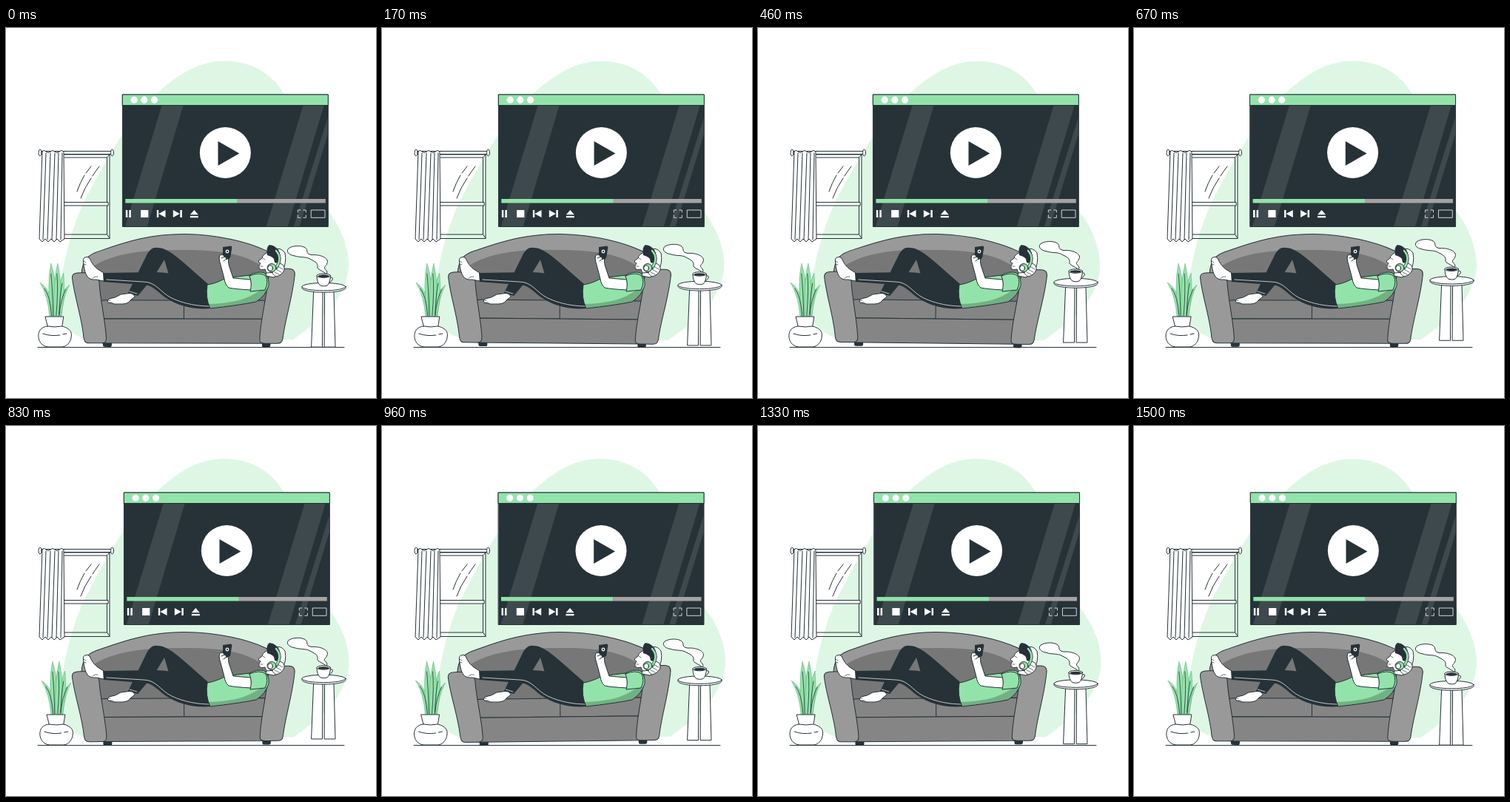
An HTML page for the animation above (1.54 s loop, 500 by 500 pixels).

```html
<!DOCTYPE html>
<html lang="en">
<head>
<meta charset="utf-8">
<title>Relaxing with a video</title>
<style>
  html, body { margin: 0; height: 100%; overflow: hidden; background: #fff; }
  svg { display: block; width: 100vw; height: 100vh; }
  .ink { fill: #263238; stroke: none; }
  .white { fill: #fff; }
  .green { fill: #92e3a9; }
  .none { fill: none; }
  .arm { fill: #999; }
  .seat { fill: #858585; }
  .flat { stroke: none; }
</style>
</head>
<body>
<svg viewBox="0 0 500 500" stroke="#263238" stroke-linejoin="round" stroke-linecap="round">
  <path id="blob" class="flat" fill="#def7e5" d="M295 44.5C335 44.5 362 65 376 90C395 125 392 190 436 248C452 268 465 298 463 325C458 370 420 398 388 421L110 421C85 414 70 400 71 376C73 335 85 280 104 238C121 204 150 150 180 112C215 76 250 44.5 295 44.5Z"/>

  <g id="window" class="none">
    <path d="M78 171H140V284.500H76M79 175H136.500V279H78M136.500 175L140 171M136.500 279L140 284"/>
    <path class="white" d="M78 235.500H138V240H78Z"/>
    <path d="M96 221Q100 209 106 199M108 196L115 187M101 230Q106 216 115 203M117 200Q120 195 126 187"/>
    <rect class="white" x="47" y="166.500" width="96" height="4" rx="1"/>
    <ellipse class="white" cx="46" cy="168.500" rx="2" ry="4.500"/>
    <ellipse class="white" cx="143.500" cy="168.500" rx="2" ry="4.500"/>
    <path class="white" d="M49 167L45 285L49 289L53 285L57 289L61 285L65 289L69 285L73 289L79 285L78 167Q75 164 72 167Q69 170 66 167Q63 164 60 167Q57 170 54 167Q51 164 49 167Z"/>
    <path d="M54 169L50 286M60 169L56 286M66 169L62 286M71 169L68 286M76 169L74 286"/>
  </g>

  <path d="M43 431.500H457"/>

  <g id="screen">
    <path fill="#263238" d="M158 90H435.500V268.500H158Z"/>
    <path class="flat" fill="#fff" fill-opacity=".11" d="M211 104H240L191 268H161ZM402 104H430L381 268H352ZM435 121V144L397 268H389Z"/>
    <path class="green" d="M157.800 90H435.500V104.500H157.800Z"/>
    <g class="white flat">
      <circle cx="173.300" cy="97.200" r="4.600"/><circle cx="187" cy="97.200" r="4.600"/><circle cx="200.700" cy="97.200" r="4.600"/>
      <circle cx="296.500" cy="168.500" r="34.500"/>
      <path d="M162 246H164.500V256H162ZM166.500 246H169V256H166.500ZM182.300 246H192.500V256H182.300ZM204 246H206.400V256H204ZM215.700 246V256L206.500 251ZM226 246V256L235 251ZM235.500 246H238V256H235.500ZM249 252.200H260L254.500 246ZM249 254H260V256.300H249Z"/>
    </g>
    <path class="ink" d="M286.700 153V186L315.500 169.500Z"/>
    <path class="flat" fill="#a6a3a2" d="M313 231H432V236.500H313Z"/>
    <path class="green flat" d="M161.500 231H313V236.500H161.500Z"/>
    <path class="none" stroke="#d0d3d4" d="M394.500 249V246H398M402 246H405.500V249M405.500 253V256.300H402M398 256.300H394.500V253M412.800 246H431.200V256.300H412.800Z"/>
  </g>

  <g id="sofa">
    <path class="ink" d="M131 424H143V429Q143 431 141 431H133Q131 431 131 429ZM346 424H357.500V429Q357 431 355 431H348Q346 431 346 429Z"/>
    <path class="arm" d="M102 333C103 313 111 306 128 301C165 288 196 278.500 241 278.500C289 279 328 290 350 300C368 308 373 316 375 328L362 385H122Z"/>
    <path class="flat" fill="#777" d="M118 322C145 305 183 299.500 235 300C290 299.500 325 305 350 325L356 375H125Z"/>
    <path class="seat" d="M128 369Q130 368 135 368H350V393H130Z"/>
    <path class="seat" d="M130 393H350V426H130ZM240.500 368V393"/>
    <path class="arm" d="M89.500 338C89 332 94 331 102 331H115C122 331 125 336 126 344C127 365 134 394 135.500 418C136 424 134 426 129 426H113C107 426 106 424 105 418C103 393 92 362 89.500 338Z"/>
    <path class="arm" d="M354 339C357 328 362 325 370 325H382C389 325 391 329 390 335C387 365 377 394 374 420C373 425 371 426 366 426H350C344 426 342 424 343 419C344 394 352 366 354 339Z"/>
  </g>

  <g id="viewer">
    <path class="white" d="M170 358L155 360Q148 365 139 366Q136 369 138 371Q146 374 158 373Q166 372 168 368L174 363Z"/>
    <path class="none" stroke-width=".7" d="M138 368H141M140 371H144"/>
    <path class="ink" d="M165 358L190 307C194 299 199 296 205 297C215 297 225 304 240 317L273 346L270 362L224 350L219 330L214 313L200 336L178 362Z"/>
    <path class="white" d="M132 331L124 326Q117 321 113 311Q110 308 107 310Q104 310 104.500 316Q106 331 110 336Q114 341 122 340L132 342Z"/>
    <path class="none" stroke-width=".7" d="M105 315L108 317M105 319L108 320M117 338Q120 335 124 336"/>
    <path class="ink" d="M131 331L198 330C227 329 245 338 273 346L278 379C254 381 233 376 215 364C203 355 198 347 185 347L132 343Z"/>
    <path class="none" stroke="#fff" stroke-width=".7" d="M136 340L186 343C203 343 209 358 224 365C241 373 260 376 276 376M167 356L177 359"/>

    <path class="white" d="M362 300Q371 295 377 304Q380 317 372 332L362 337L351 335Z"/>
    <path class="green" d="M272 347C284 345 291 341 297 338L329 334Q340 328 349 331Q356 337 355 348Q351 362 338 370Q313 375 276 379Q269 364 272 347Z"/>
    <path class="flat" fill="#000" fill-opacity=".22" d="M354 352Q348 365 338 370Q312 375 277 378.500L274 373C305 372 325 367 341 356Z"/>
    <path class="white" d="M290 320C287 311 288 305 292 305L300 309L301 320L307 338L331 340L332 354Q310 353 301 351Q296 347 295 339Z"/>
    <path class="green" d="M329 335Q343 329 351 335Q355 344 350 354L330 356Q333 344 329 335Z"/>
    <path class="ink" d="M293 296L304 294.500Q305.500 295 305.300 297L303 311L298 313L293 307Z"/>
    <circle cx="299" cy="302" r="1.800" fill="none" stroke="#fff" stroke-width="1.300"/>
    <path class="white" d="M290 307L294 306M291 311L296 309L298 312L294 315"/>
    <path class="white" d="M354 303Q347 306 346 311L341 315Q341 317 344 318Q341 321 342 325Q345 328 350 326L352 331L364 330L369 314L364 302Z"/>
    <path class="none" stroke-width=".7" d="M347 311L350 313M344 322L347 322"/>
    <path class="ink" d="M353 307Q351 296 356 293Q366 294 370 304L368 318L363 317Q363 309 353 307Z"/>
    <path class="white" d="M360 331Q362 321 370 318Q377 320 376 327Q373 334 365 336Z"/>
    <path class="none" stroke-width=".7" d="M367 322L374 326M365 326L372 330M363 330L369 333"/>
    <path class="none" stroke-width="4.200" d="M365 301Q374 311 365 324"/>
    <path class="none" stroke="#92e3a9" stroke-width="2.600" d="M365 301Q374 311 365 324"/>
    <ellipse class="green" cx="359" cy="324" rx="6" ry="5.500"/>
    <ellipse class="white" cx="357" cy="324.500" rx="3.300" ry="3.700"/>
  </g>

  <g id="plant">
    <g class="green" stroke="#4f9a67" stroke-width=".4">
      <path d="M59 390Q57 362 46 344Q63 354 66 390Z"/>
      <path d="M68 390Q71 358 86 347Q77 364 75 390Z"/>
      <path d="M69 390Q68 352 78 331Q81 362 74 390Z"/>
      <path d="M61 390Q55 345 61 318Q70 345 68 390Z"/>
      <path d="M65 390Q63 345 70 318Q78 350 71 390Z"/>
    </g>
    <path class="none" stroke-width=".8" d="M64 389Q63 352 61 332M68 389Q71 352 69 332M62 389Q60 362 52 352M72 389Q74 366 81 353M72 387Q73 360 76 345"/>
    <path class="white" d="M53.500 390H78L76 403C87 406 89 411 88.500 416C88 425 82 430.500 76 431H57C48 430 44 423 44 416C44 409 48 404 56 403Z"/>
    <path class="none" d="M56 403Q66 405 76 403M50 413Q61 417 73 415M77 414L82 413"/>
  </g>

  <g id="table" class="white">
    <path d="M416 356H428L427.500 431.500H413ZM431 356H443L445 431.500H430.500Z"/>
    <path d="M400 350V352C404 359.500 455 359.500 459 352V350Z"/>
    <ellipse cx="429.500" cy="350" rx="29.500" ry="5.200"/>
    <path d="M433 333C428 328 420 327 421 323C422 317 415 315 410 312C404 309 398 311 389 308C382 307 378 302 382 298C388 294 399 294 404 297C410 301 403 305 413 307C424 306 437 311 434 318C433 323 427 323 433 328Q435 330 433 333Z"/>
    <path class="none" d="M437 338Q443 336 441 341Q439 344 436 344"/>
    <path d="M420 335Q420 345 425 348.500Q430 350 434 348.500Q438 345 438.500 335Z"/>
    <ellipse cx="429.200" cy="335" rx="9.300" ry="2.700"/>
    <ellipse class="ink" cx="429.200" cy="335.500" rx="7.500" ry="1.800"/>
  </g>
</svg>
<script>
  const LOOP = 1540, CYCLE = 1500, STEP = 1000 / 24, LEAD = 26;
  const SHAKE = [0, -1, 2, -4, 4, -4, 4, -4, 2, -1, 0];
  const SWAY = [0, 1, 0, -1, 0];
  const FLOAT = [0, -10, 0];

  // Linear interpolation through evenly spaced keys, p in [0, 1)
  function along(keys, p) {
    const x = p * (keys.length - 1), i = Math.floor(x);
    return keys[i] + (keys[i + 1] - keys[i]) * (x - i);
  }

  function place(id, transform) {
    document.getElementById(id).setAttribute("transform", transform);
  }

  function draw() {
    const t = performance.now() % LOOP;
    const held = Math.floor((t + 5) / STEP) * STEP;
    const p = (held + LEAD) % CYCLE / CYCLE;
    const shake = along(SHAKE, p), sway = along(SWAY, p);
    place("screen", `translate(${shake})`);
    place("plant", `translate(${shake})`);
    place("blob", `rotate(${sway} 268 235)`);
    place("sofa", `rotate(${sway} 240 354)`);
    place("table", `translate(0 ${along(FLOAT, p)})`);
    requestAnimationFrame(draw);
  }
  draw();
</script>
</body>
</html>
```
